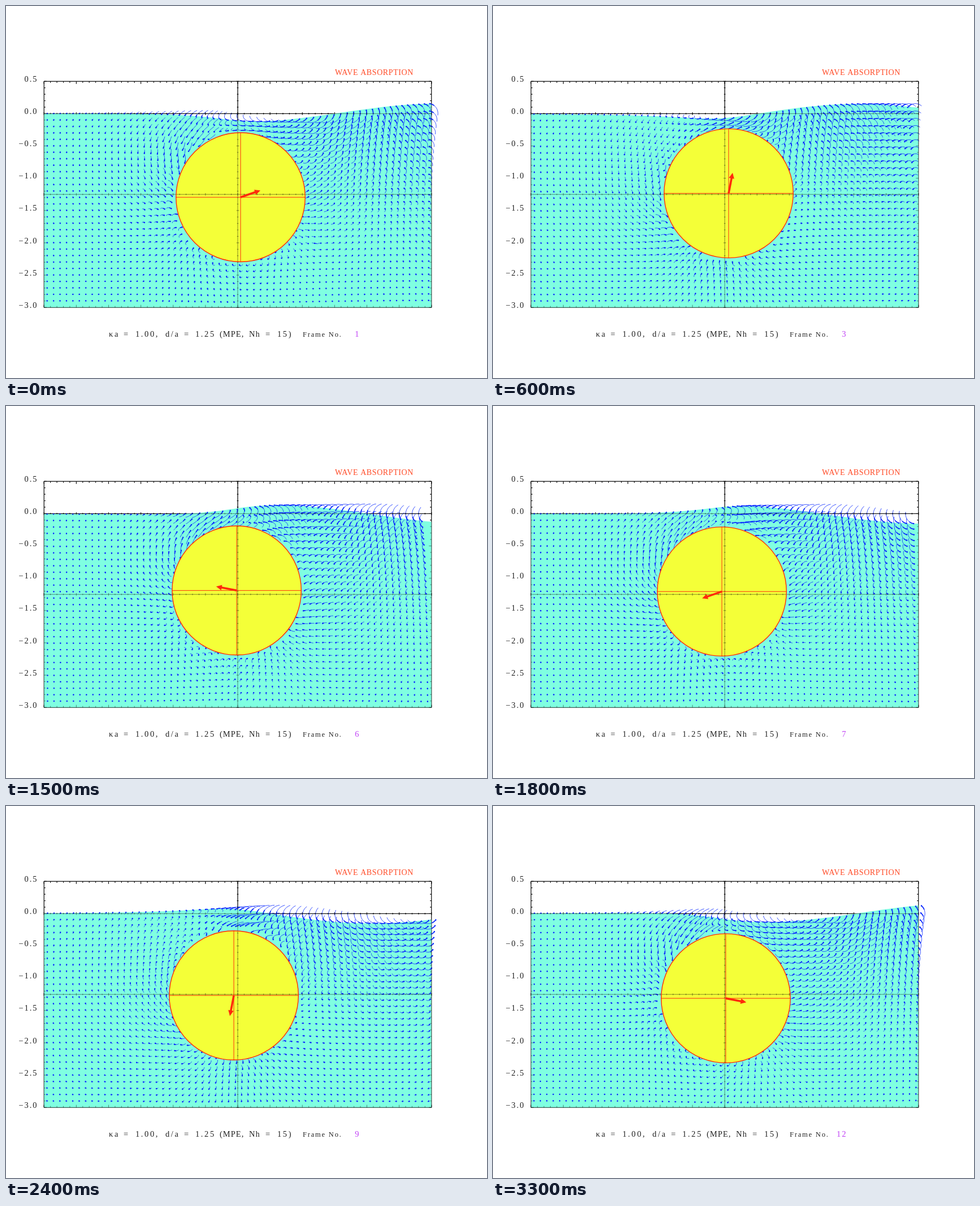
An HTML page with a canvas for the animation above (3600 ms loop, 851 by 658 pixels).

```html
<!DOCTYPE html>
<html lang="en">
<head>
<meta charset="utf-8">
<title>Wave absorption</title>
<style>
html, body { margin: 0; width: 100%; height: 100%; overflow: hidden; background: #fff; }
canvas { display: block; }
</style>
</head>
<body>
<canvas id="stage" width="851" height="658"></canvas>
<script>
const ctx = document.getElementById('stage').getContext('2d');
const FRAMES = 12, FRAME_MS = 300, STEP = 2 * Math.PI / FRAMES;
const UNIT = 114.25, DEPTH = 1.25, ORBIT = 0.0625, ORDER = 10;
const BLUE = '#0a28ff', RED = '#ff2a0c', INK = '#222';
const X = x => 410 + UNIT * x;
const Y = y => 190.4 - UNIT * y;

// Complex numbers as [re, im]
const add = (a, b) => [a[0] + b[0], a[1] + b[1]];
const mul = (a, b) => [a[0] * b[0] - a[1] * b[1], a[0] * b[1] + a[1] * b[0]];
const scale = (a, k) => [a[0] * k, a[1] * k];
const conj = a => [a[0], -a[1]];
const inverse = a => scale(conj(a), 1 / (a[0] ** 2 + a[1] ** 2));
const polar = (r, angle) => [r * Math.cos(angle), r * Math.sin(angle)];

// Free-surface images of the multipoles 1/p^m, with waves on the right side only
function images(p, count) {
  const q = [-p[1], p[0]];
  let sum = [0.5772156649 + Math.log(Math.hypot(...q)), Math.atan2(q[1], q[0]) + Math.PI];
  let term = [1, 0];
  for (let k = 1; k < 45; k++) {
    term = scale(mul(term, q), 1 / k);
    sum = add(sum, scale(term, 1 / k));
  }
  let integral = mul(polar(Math.exp(-q[0]), -q[1]), sum);
  const inv = inverse(p), result = [];
  let power = inv;
  for (let m = 1; m <= count; m++) {
    result[m] = add(power, mul([0, -2], integral));
    integral = scale(add(mul([0, 1], integral), scale(power, -1)), 1 / m);
    power = mul(power, inv);
  }
  return result;
}

function binomial(n, k) {
  let value = 1;
  for (let i = 1; i <= k; i++) value *= (n - k + i) / i;
  return value;
}

// Multipole strengths that satisfy the condition on the orbiting cylinder
function solveStrengths() {
  const self = images([0, -2 * DEPTH], 2 * ORDER).map(conj);
  const drive = mul([0, -1], polar(ORBIT, -Math.PI / 4));
  let strengths = Array.from({ length: ORDER + 1 }, () => [0, 0]);
  for (let pass = 0; pass < 150; pass++) {
    strengths = strengths.map((_, n) => {
      let total = n === 1 ? drive : [0, 0];
      if (n) for (let m = 1; m <= ORDER; m++) {
        const weight = (-1) ** n * binomial(m + n - 1, n);
        total = add(total, scale(mul(strengths[m], self[m + n]), weight));
      }
      return total;
    });
  }
  return strengths;
}
const strengths = solveStrengths();

// Particle orbit about (x, y): counterclockwise and clockwise parts
function orbitAt(x, y) {
  const image = images([x, y - DEPTH], ORDER + 1);
  const inv = inverse([x, y + DEPTH]);
  let power = inv, ccw = [0, 0], cw = [0, 0];
  for (let m = 1; m <= ORDER; m++) {
    power = mul(power, inv);
    ccw = add(ccw, scale(mul(conj(strengths[m]), image[m + 1]), -m));
    cw = add(cw, scale(mul(strengths[m], power), -m));
  }
  return { x, y, ccw: mul([0, -1], conj(ccw)), cw: mul([0, 1], conj(cw)) };
}
const shift = (o, phase) =>
  add(mul(o.ccw, polar(1, phase)), mul(o.cw, polar(1, -phase)));

const particles = [];
for (let row = 0; row < 30; row++)
  for (let col = 0; col < 60; col++) {
    const x = -2.95 + col / 10, y = -row / 10;
    if (Math.hypot(x, y + DEPTH) > 1) particles.push(orbitAt(x, y));
  }
const surface = Array.from({ length: 121 }, (_, i) => orbitAt(-3 + i / 20, 0));

function line(x1, y1, x2, y2) {
  ctx.moveTo(x1, y1);
  ctx.lineTo(x2, y2);
}

function drawAxes(alpha) {
  const left = X(-3), right = X(3), top = Y(0.5), bottom = Y(-3);
  ctx.globalAlpha = alpha;
  ctx.strokeStyle = '#000';
  ctx.lineWidth = 1;
  ctx.beginPath();
  ctx.rect(left, top, right - left, bottom - top);
  line(left, Y(0), right, Y(0));
  line(left, Y(-DEPTH), right, Y(-DEPTH));
  line(X(0), top, X(0), bottom);
  for (let i = -30; i <= 30; i++) {
    const x = X(i / 10), size = i % 5 ? 2.5 : 4.5;
    line(x, top, x, top + size);
    line(x, bottom, x, bottom - size);
    for (const y of [Y(0), Y(-DEPTH)]) line(x, y - size / 2, x, y + size / 2);
  }
  for (let i = -30; i <= 5; i++) {
    const y = Y(i / 10), size = i % 5 ? 2.5 : 4.5;
    line(left, y, left + size, y);
    line(right, y, right - size, y);
    line(X(0) - size / 2, y, X(0) + size / 2, y);
  }
  ctx.stroke();
  ctx.globalAlpha = 1;
}

function drawFluid(phase) {
  ctx.fillStyle = '#7fffe1';
  ctx.beginPath();
  ctx.moveTo(X(-3), Y(-3));
  for (const o of surface) ctx.lineTo(X(o.x), Y(shift(o, phase)[1]));
  ctx.lineTo(X(3), Y(-3));
  ctx.fill();
}

// Each trail covers the last quarter period and thickens towards its head
function drawTrails(phase) {
  const strokeTails = (length, width) => {
    ctx.lineWidth = width;
    ctx.beginPath();
    for (const o of particles)
      for (let i = 0; i <= 8; i++) {
        const d = shift(o, phase - length * (1 - i / 8));
        const x = X(o.x + d[0]), y = Y(o.y + d[1]);
        i ? ctx.lineTo(x, y) : ctx.moveTo(x, y);
      }
    ctx.stroke();
  };
  ctx.strokeStyle = ctx.fillStyle = BLUE;
  ctx.lineCap = 'round';
  strokeTails(Math.PI / 2, 0.8);
  strokeTails(Math.PI / 7, 1.7);
  ctx.beginPath();
  for (const o of particles) {
    const d = shift(o, phase), x = X(o.x + d[0]), y = Y(o.y + d[1]);
    ctx.moveTo(x, y);
    ctx.arc(x, y, 1.25, 0, 7);
  }
  ctx.fill();
  ctx.lineCap = 'butt';
}

function drawCylinder(phase) {
  const [dx, dy] = polar(ORBIT, phase - Math.PI / 4);
  const x = X(dx), y = Y(dy - DEPTH);
  ctx.fillStyle = '#f4ff38';
  ctx.beginPath();
  ctx.arc(x, y, UNIT, 0, 7);
  ctx.fill();
  drawAxes(0.45);
  ctx.strokeStyle = ctx.fillStyle = RED;
  ctx.lineWidth = 1.4;
  ctx.beginPath();
  ctx.arc(x, y, UNIT, 0, 7);
  ctx.stroke();
  ctx.lineWidth = 1;
  ctx.beginPath();
  line(x - UNIT, y, x + UNIT, y);
  line(x, y - UNIT, x, y + UNIT);
  ctx.stroke();

  ctx.save();
  ctx.translate(x, y);
  ctx.rotate(-phase - 19 * Math.PI / 180);
  ctx.fillRect(0, -1.8, 29, 3.6);
  ctx.beginPath();
  ctx.moveTo(37, 0);
  ctx.lineTo(27, -4.8);
  ctx.lineTo(27, 4.8);
  ctx.fill();
  ctx.restore();
}

function label(text, x, y, { size = 14.5, spacing = 2, color = INK, align = 'left' } = {}) {
  ctx.font = `${size}px "Liberation Serif", serif`;
  ctx.letterSpacing = spacing + 'px';
  ctx.textAlign = align;
  ctx.fillStyle = color;
  ctx.fillText(text, x, y);
}

function drawLabels(number) {
  label('WAVE ABSORPTION', 582, 122, { size: 14, spacing: 0.6, color: '#ff4a26' });
  for (let i = 1; i >= -6; i--)
    label((i / 2).toFixed(1).replace('-', '−'), 56.5, Y(i / 2) + 0.7, { align: 'right' });
  const words = [['κa', 182], ['=', 208], ['1.00,', 229], ['d/a', 282], ['=', 315],
    ['1.25', 335], ['(MPE,', 378, 1], ['Nh', 430, 1], ['=', 459], ['15)', 480]];
  for (const [text, x, spacing = 2.6] of words) label(text, x, 585, { spacing });
  label('Frame No.', 525, 585, { size: 12.5, spacing: 1.8 });
  label(number, 626.5, 585, { align: 'right', color: '#c040f5' });
}

let shown = -1;
function tick(now) {
  const step = Math.floor(now / FRAME_MS) % FRAMES;
  if (step !== shown) {
    shown = step;
    const phase = step * STEP;
    ctx.fillStyle = '#fff';
    ctx.fillRect(0, 0, 851, 658);
    drawAxes(1);
    drawFluid(phase);
    drawTrails(phase);
    drawCylinder(phase);
    drawLabels(step + 1);
  }
  requestAnimationFrame(tick);
}
tick(0);
</script>
</body>
</html>
```
